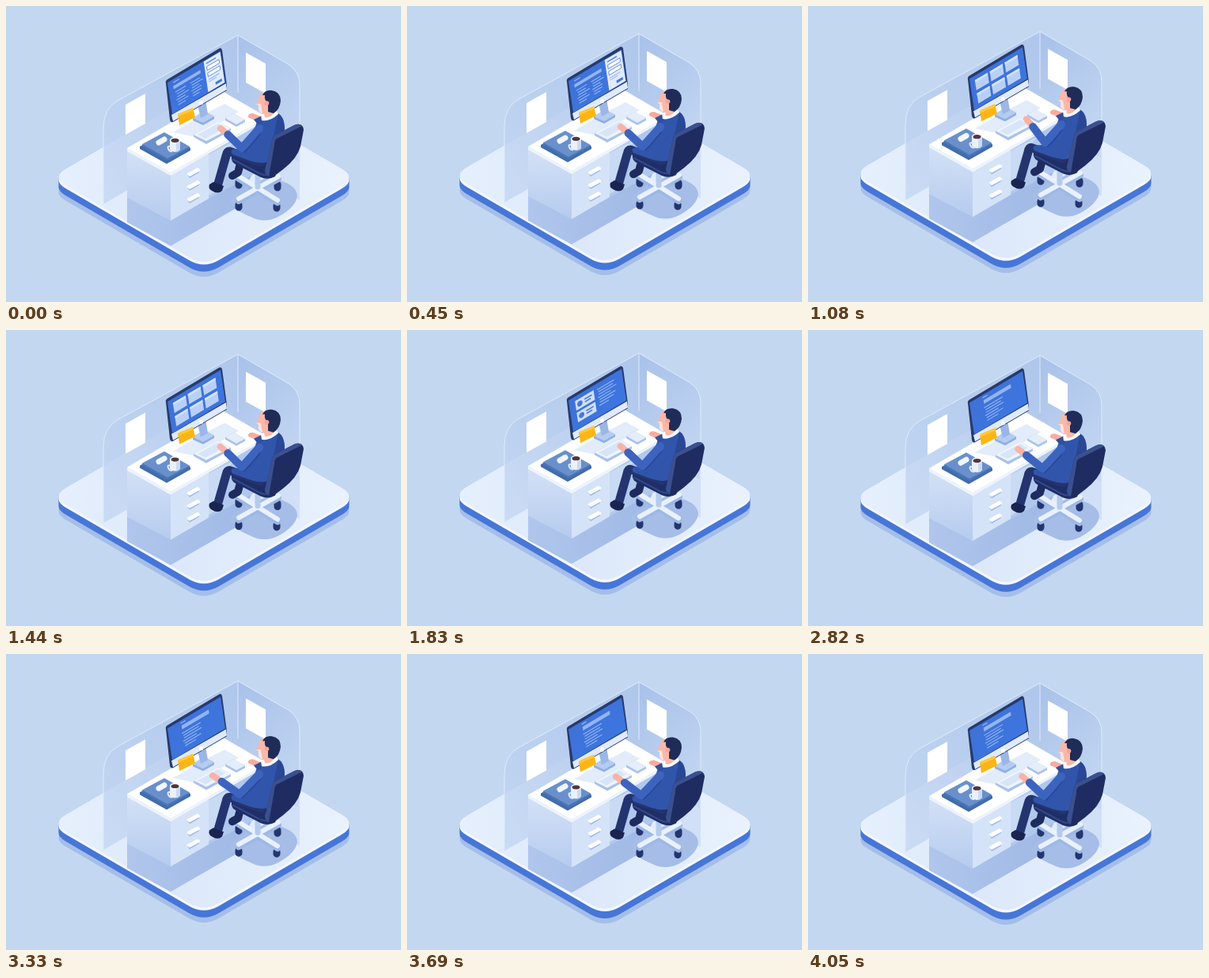
Recreate the animation shown at these times as an HTML page. Size 499x375 px, loop 4080 ms.

```html
<!DOCTYPE html>
<html lang="en">
<head>
<meta charset="utf-8">
<title>Office desk</title>
<style>
html, body { margin: 0; width: 100%; height: 100%; overflow: hidden; background: #c3d8f0; }
svg { display: block; width: 100%; height: 100%; }
</style>
</head>
<body>
<svg viewBox="0 0 499 375">
  <defs>
    <linearGradient id="floor" x2="1"><stop stop-color="#e6f0fd"/><stop offset=".4" stop-color="#dce8fa"/><stop offset="1" stop-color="#e9f2fd"/></linearGradient>
    <linearGradient id="left" x1="1" y1="0" x2="0" y2="1"><stop stop-color="#a9c2ea"/><stop offset="1" stop-color="#c4d7f2"/></linearGradient>
    <linearGradient id="right" x2=".4" y2="1"><stop stop-color="#a3bde8"/><stop offset="1" stop-color="#c2d5f2"/></linearGradient>
    <linearGradient id="side" x2="0" y2="1"><stop stop-color="#d4e2f7"/><stop offset="1" stop-color="#b6cbee"/></linearGradient>
    <linearGradient id="shade" x2="1"><stop stop-color="#b0c6ec"/><stop offset="1" stop-color="#9fb9e5"/></linearGradient>
    <linearGradient id="glow" x2="1" y2="1"><stop stop-color="#3f6fd3"/><stop offset="1" stop-color="#3c78e4"/></linearGradient>
  </defs>
  <g id="scene">
    <g id="base"></g>

    <!-- walls -->
    <path d="M293 153L371 198V246L293 200Z" fill="#b9cdef" opacity=".45"/>
    <path d="M123 251V155Q123 130 141 120L293 37V153Z" fill="url(#left)" opacity=".8"/>
    <path d="M293 37L357 74Q371 83 371 100V198L293 153Z" fill="url(#right)" opacity=".85"/>
    <path d="M123 251V155Q123 130 141 120L293 37L357 74Q371 83 371 100V198M293 37V110" fill="none" stroke="#dfeafb"/>
    <path d="M151 125L176 111V149L151 163ZM303 59L328 73V111L303 97Z" fill="#fff"/>

    <!-- floor shadows -->
    <path d="M153 243V274L208 304L291 256L310 215L255 190Z" fill="url(#shade)"/>
    <path d="M283 248Q283 240 295 234L330 217Q368 224 368 241Q366 255 344 267Q326 276 309 267Q285 257 283 248Z" fill="#a5bde7"/>

    <!-- desk -->
    <path d="M256 183L328 143V205L256 244Z" fill="#b1c8ed"/>
    <path d="M256 188L290 170L278 185L270 232L256 240Z" fill="#c9daf4"/>
    <path d="M153 180L208 211V272L153 243Z" fill="url(#side)"/>
    <path d="M208 211L256 184V244L208 272Z" fill="#d5e3f8"/>
    <path d="M153 180L275 109L330 141L208 211Z" fill="#fff"/>
    <path d="M153 180L208 211L330 141V144L208 215L153 184Z" fill="#eef4fd"/>
    <g id="drawers"></g>

    <!-- desk items -->
    <path d="M211 160L247 139L276 124L294 134L240 166Z" fill="#e2ecfa"/>
    <path d="M277 142L287 136L302 144V147L291 153L277 145Z" fill="#a9c2ea"/>
    <path d="M277 142L287 136L302 144L291 150Z" fill="#e4edfb"/>
    <path d="M237 163L268 146L284 155V158L253 175L237 166Z" fill="#a9c2ea"/>
    <path d="M237 163L268 146L284 155L253 171Z" fill="#eef4fe"/>
    <path d="M242 163L268 149L277 154L252 168Z" fill="#d8e5f9"/>
    <path d="M169 178L200 161L233 180V183L203 200L169 181Z" fill="#416cab"/>
    <path d="M172 175L200 160L232 178L204 195Z" fill="#6990cc"/>
    <path d="M172 175L204 193L232 178V180L204 196L172 178Z" fill="#4a75b5"/>
    <path d="M193 173L200 169" stroke="#f1f6fe" stroke-width="7" stroke-linecap="round"/>
    <path d="M208 178Q203 177 205 181T210 184" fill="none" stroke="#e3edfb" stroke-width="2"/>
    <path d="M207 170V182Q213 188 220 182V170Z" fill="#eaf1fd"/>
    <path d="M215 170H220V182Q218 185 215 185Z" fill="#c9daf4"/>
    <ellipse cx="213.5" cy="170" rx="6.5" ry="3.7" fill="#fff"/>
    <ellipse cx="213.5" cy="170.3" rx="5" ry="2.6" fill="#503642"/>

    <!-- monitor -->
    <path d="M236 142L250 133L263 140V143L249 151L236 145Z" fill="#8fafe2"/>
    <path d="M236 142L250 133L263 140L249 148Z" fill="#b5ccf0"/>
    <path d="M242 125L252 119L255 137L246 142Z" fill="#9ab7e7"/>
    <path d="M204 93L269 54Q272 52 273 56L279 101V107L211 147Q208 148 207 144L202 98Q201 95 204 93Z" fill="#273a6b"/>
    <path d="M209 138L278 98L279 106L211 146Z" fill="#dfeafb"/>
    <circle cx="246.5" cy="122.5" r="2.6" fill="#fff"/>
    <path d="M204 97L271 57L277 97L210 137Z" fill="url(#glow)"/>
    <g id="screen" transform="matrix(.67 -.4 .1 .667 204 97)"></g>
    <path d="M217 137L236 129L239 141L219 151Z" fill="#fdb515"/>
    <path d="M217 137L236 129L237 132L218 140Z" fill="#ffc93a"/>

    <!-- chair frame -->
    <g stroke-linecap="round" stroke-linejoin="round" fill="none">
      <path d="M294 223V227M343 226V230M294 252V255M342 253V256" stroke="#24366f" stroke-width="9"/>
      <path d="M293 218L343 249M344 219L294 247" stroke="#9db8e6" stroke-width="8"/>
      <path d="M293 215L343 246M344 216L294 244" stroke="#e9f1fd" stroke-width="6"/>
      <path d="M318 211V229" stroke="#b5cbee" stroke-width="7"/>
    </g>

    <!-- far leg -->
    <path d="M297 196L293 211L286 215" fill="none" stroke="#1d2b5e" stroke-width="10" stroke-linecap="round" stroke-linejoin="round"/>
    <!-- seat -->
    <path d="M285 190Q287 184 296 184L350 190L340 216Q331 221 322 217L289 200Q284 197 285 190Z" fill="#1f2e66"/>
    <path d="M286 194L320 212Q330 217 340 211" fill="none" stroke="#33498b" stroke-width="2"/>
    <!-- near leg -->
    <path d="M322 198L282 184Q279 184 278 190L268 225" fill="none" stroke="#24346f" stroke-width="11" stroke-linecap="round" stroke-linejoin="round"/>
    <path d="M262 223L275 228L273 234Q268 239 260 234Q255 231 257 226Z" fill="#192450"/>

    <!-- body -->
    <path d="M317 147Q327 140 343 136Q351 139 352 154L345 189Q331 204 308 196L286 188Q281 180 294 181L306 177Z" fill="#3155ab"/>
    <path d="M344 136Q352 141 352 156L346 190L329 200L338 165Z" fill="#294795"/>
    <path d="M306 141Q305 136 312 136L322 140L315 145Z" fill="#f7ac9f"/>
    <path d="M313 144L323 139L325 147L318 150Z" fill="#2f4f9f"/>
    <path d="M322 138L341 131L344 137Q333 147 323 145Z" fill="#f8fbff"/>
    <path d="M324 110Q319 113 319 118L316 124L319 126V132Q322 137 326 136L327 141Q334 142 338 136L336 114Z" fill="#f9b8a9"/>
    <path d="M316 124L319 126V132Q321 136 324 136L322 124Z" fill="#fde3dd"/>
    <path d="M324 113Q327 106 336 107Q347 109 347 120Q346 131 338 136L331 134L331 122Q326 120 327 113Z" fill="#202c58"/>
    <circle cx="329.5" cy="123" r="2.8" fill="#f5a698"/>

    <!-- moving arm -->
    <g fill="none" stroke-linecap="round" stroke-linejoin="round">
      <path id="hand" stroke="#f9b3a5" stroke-width="8"/>
      <path id="arm" stroke="#3c64bf" stroke-width="10"/>
      <path id="fold" stroke="#294795" stroke-width="1.5"/>
    </g>

    <!-- chair back -->
    <path d="M336 170Q337 164 343 162L364 151Q375 147 376 157L372 178Q368 193 350 207L338 216Q329 219 327 210Z" fill="#1e2c62"/>
    <path d="M336 170Q337 164 343 162L364 151Q371 148 374 152L342 168Q339 170 339 176L332 216Q327 214 327 208Z" fill="#3a508f"/>
  </g>
</svg>
<script>
const LOOP = 4080;
const $ = id => document.getElementById(id);
const range = n => [...Array(n).keys()];

// floor slab extruded downwards by h
const slab = (h, fill) => `<path fill="${fill}" d="M66.5 217v${h}q0 5.5 9.5 11l156 91q18 10 36 0
  l156-91q9.5-5.5 9.5-11v${-h}q0-5.5-9.5-11l-156-91q-18-10-36 0l-156 91q-9.5 5.5-9.5 11z"/>`;
$('base').innerHTML = slab(19, '#a5bee8') + slab(12.5, '#4676d8') +
  slab(3.5, '#f4f8fe') + slab(0, 'url(#floor)');

$('drawers').innerHTML = [0, 16, 32].map(y => `<g transform="translate(0 ${y})">
  <path d="M229 214L244 206V211L232 218Z" fill="#9fb9e6"/>
  <path d="M229 212L242 205L245 207V209L232 216L229 214Z" fill="#fff"/></g>`).join('');

const box = (x, y, w, h, fill, extra = '') =>
  `<rect x="${x}" y="${y}" width="${w}" height="${h}" fill="${fill}" ${extra}/>`;
const PALE = '#b9d0f6', TEXT = '#93b5f2', BLUE = '#4779da';
const lines = (x, y, widths, gap = 5) =>
  widths.map((w, i) => box(x + (i % 3 ? 2 : 0), y + i * gap, w, 1.8, TEXT)).join('');

const form = box(10, 5, 11, 2, TEXT) + box(9, 12, 51, 6, TEXT) +
  lines(11, 24, [20, 15, 22, 17, 20, 14]) + lines(39, 24, [18, 21, 14, 19, 16, 12]) +
  box(68, 1, 31, 58, '#e1ebfc') + box(72, 6, 18, 2, BLUE) +
  [13, 25].map(y => box(72, y, 23, 7, '#fff', `stroke="${BLUE}"`)).join('') +
  box(72, 37, 20, 1.5, TEXT) + box(72, 41, 15, 1.5, TEXT) + box(83, 49, 12, 5, BLUE);

const cards = range(6).map(i =>
  box(9 + i % 3 * 28, 8 + (i > 2) * 25, 24, 19, PALE) +
  box(9 + i % 3 * 28, 8 + (i > 2) * 25, 24, 4, '#d5e3fb')).join('');

const profiles = [8, 30].map(y => box(11, y, 35, 18, '#cfdffa') +
  `<circle cx="19" cy="${y + 9}" r="5" fill="${BLUE}"/>` +
  box(28, y + 5, 14, 2.5, BLUE) + box(28, y + 10, 11, 2.5, BLUE)).join('') +
  lines(52, 10, [32, 27, 33, 24, 30, 26, 18]);

const code = box(24, 4, 9, 2, TEXT) + box(25, 10, 51, 7, TEXT) +
  lines(24, 23, [35, 29, 33, 25, 31, 21]);

const pages = [[0, form], [800, cards], [1500, profiles], [2750, code]];
$('screen').innerHTML = pages.map(([, page]) => `<g>${page}</g>`).join('');

// linear interpolation through rows of [time, ...values]
function track(keys, t) {
  const i = keys.findIndex(k => k[0] > t);
  const a = keys[i - 1], b = keys[i], p = (t - a[0]) / (b[0] - a[0]);
  return a.slice(1).map((v, j) => v + (b[j + 1] - v) * p);
}
const lift = [[0, 0], [1650, 7.1], [1920, 7.9], [2190, 7.1], [LOOP, 0]];
const reach = [[0, 272, 155], [450, 271, 155], [1080, 277, 148], [1500, 271, 155],
  [2400, 270, 154.5], [3330, 262, 157], [3700, 265, 157], [LOOP, 272, 155]];

function draw(now) {
  const t = now % LOOP;
  $('scene').setAttribute('transform', `translate(0 ${-track(lift, t)[0]})`);

  const [x, y] = track(reach, t);
  const ex = 298 + (x - 272) * .3, ey = 180 + (y - 155) * .3;
  const wx = x + (ex - x) * .32, wy = y + (ey - y) * .32;
  $('hand').setAttribute('d', `M${x - 1} ${y}L${wx} ${wy}`);
  $('arm').setAttribute('d', `M${wx} ${wy}L${ex} ${ey}L320 155`);
  $('fold').setAttribute('d', `M${ex + 3} ${ey + 5}L${ex + 10} ${ey - 2}L321 162`);

  const current = pages.filter(p => p[0] <= t).length - 1;
  [...$('screen').children].forEach((g, i) => g.style.display = i === current ? '' : 'none');
  requestAnimationFrame(draw);
}
requestAnimationFrame(draw);
</script>
</body>
</html>
```
